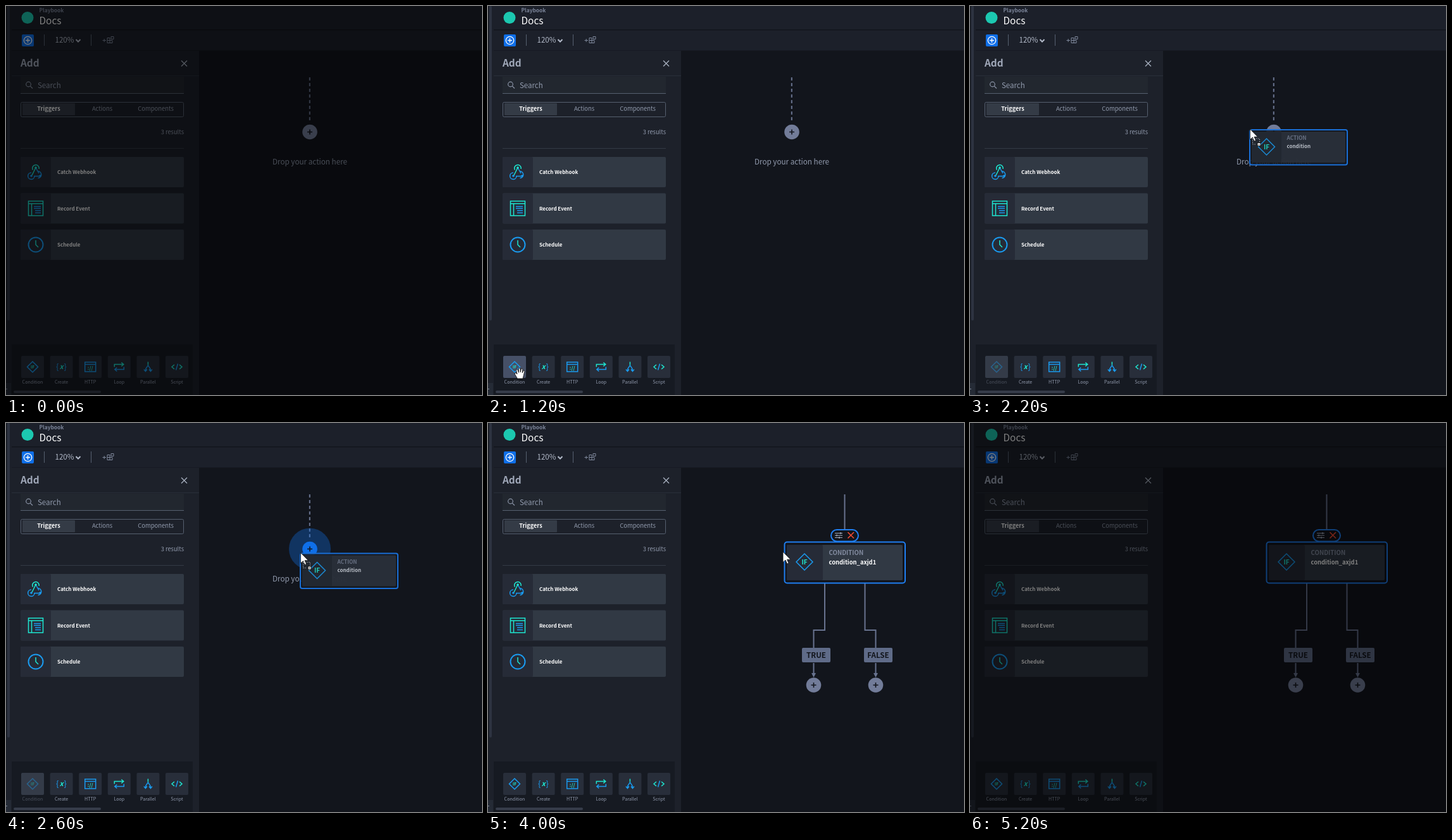
Recreate the animation shown at these times as an HTML page. Size 752x616 px, loop 5400 ms.

```html
<!DOCTYPE html>
<html lang="en">
<head>
<meta charset="utf-8">
<title>Playbook</title>
<style>
  html, body { margin: 0; width: 100%; height: 100%; overflow: hidden; background: #12151c; }
  svg { display: block; }
  text { font-family: "Noto Sans CJK JP", "Noto Sans CJK SC", "Noto Sans CJK", "Open Sans", sans-serif; fill: #929bae; }
  .b { font-weight: 700; }
  .w { fill: #fff; }
  .m { text-anchor: middle; }
  .blue, .teal, .line { fill: none; stroke-width: 1.5; }
  .blue { stroke: #1a9bf0; }
  .teal { stroke: #1ee8d2; }
  .line { stroke: #68738f; stroke-width: 2; }
  .tealText { fill: #1ee8d2; }
  .head { fill: #68738f; }
</style>
</head>
<body>
<svg id="stage" width="752" height="616" viewBox="0 0 752 616"></svg>
<script>
const $ = id => document.getElementById(id);
const rect = (x, y, w, h, fill, more = '') =>
  `<rect x="${x}" y="${y}" width="${w}" height="${h}" fill="${fill}" ${more}/>`;
const text = (x, y, size, str, cls = '', more = '') =>
  `<text x="${x}" y="${y}" font-size="${size}" class="${cls}" ${more}>${str}</text>`;
const path = (cls, d, more = '') => `<path class="${cls}" d="${d}" ${more}/>`;
const at = (x, y, body) => `<g transform="translate(${x} ${y})">${body}</g>`;

const diamond = (r, size) =>
  path('blue', `M0 ${-r}L${r} 0 0 ${r} ${-r} 0Z`) + text(0, size * .37, size, 'IF', 'b m tealText');
const plus = (x, y, id = '') => at(x, y,
  `<circle r="11.8" fill="#727c99" ${id}/><path d="M-4 0H4M0-4V4" stroke="#12151c" stroke-width="1.6"/>`);

const cardIcons = {
  'Catch Webhook':
    path('teal', 'M-4.5-3.5A5.2 5.2 0 1 1 5-5M0-7L-6 5') +
    path('blue', 'M-7 1A5.2 5.2 0 1 0-2 7M-3 6.500H7M3-1.500A5.200 5.200 0 1 1 3.500 9.500M0-7L5 2') +
    '<circle cy="-7" r="1.8" fill="#1ee8d2"/><circle cx="-7" cy="6" r="1.8" fill="#1a9bf0"/><circle cx="7" cy="6" r="1.8" fill="#1a9bf0"/>',
  'Record Event':
    path('teal', 'M-11.500-11.500H11.500V11.500H-11.500ZM-11.500-7.500H11.500M-6.500-7.500V11.500') +
    path('blue', 'M-3-3H8M-3 0H8M-1 3.500H8M-1 7H8'),
  'Schedule':
    '<circle r="11.500" class="blue" style="stroke-width:2"/>' + path('teal', 'M0-7V0L4 4', 'stroke-width="2"')
};

const tileIcons = {
  Condition: diamond(8.5, 6.5),
  Create: text(-8.5, 4, 13, '{', '', 'style="fill:#1a9bf0"') + text(4, 4, 13, '}', '', 'style="fill:#1a9bf0"') +
    text(0, 3.5, 11, 'x', 'b m tealText', 'font-style="italic"'),
  HTTP: path('blue', 'M-8.500-7.500H8.500V7.500H-8.500ZM-8.500-4H8.500') + text(0, 4.5, 8, '://', 'b m tealText'),
  Loop: path('teal', 'M-7.500 0V-4H6M3.500-7L7-4 3.500-1') + path('blue', 'M7.500 0V4H-6M-3.500 1L-7 4-3.500 7'),
  Parallel: path('teal', 'M0-8V-3') + path('blue', 'M0-3C0 0-4 0-4 6M0-3C0 0 4 0 4 6M-6.500 4L-4 7-1.500 4M1.500 4L4 7 6.500 4'),
  Script: path('teal', 'M-4-3.500L-8 0-4 3.500M4-3.500L8 0 4 3.500') + path('blue', 'M1.500-5L-1.500 5')
};

const cards = Object.entries(cardIcons).map(([name, icon], i) => {
  const y = 239 + i * 57.5;
  return rect(23, y, 258, 48, '#313944', 'rx="2"') + rect(23, y, 48, 48, '#262b37', 'rx="2"') +
    at(47, y + 24, icon) + text(81, y + 27, 8, name, 'b w');
}).join('');

const tiles = Object.entries(tileIcons).map(([name, icon], i) =>
  at(24 + i * 45.6, 554, rect(0, 0, 36, 35, '#282e3a', `rx="2" id="tile${i}"`) +
    `<g id="face${i}">${at(18, 17.5, icon)}${text(18, 44, 7.1, name, 'm')}</g>`)).join('');

const header =
  rect(0, 0, 752, 71, '#1c202a') + rect(9, 37, 743, 1.5, '#12151c') + rect(9, 70.5, 743, 1.5, '#12151c') +
  '<circle cx="34" cy="18.500" r="9.500" fill="#1cc8b0"/>' +
  text(52.5, 10, 8.4, 'Playbook', 'b', 'style="fill:#7b8499"') + text(52.5, 29, 15.4, 'Docs', 'w') +
  rect(25, 45, 19, 19, '#0f6fe8', 'rx="2"') +
  '<g fill="none" stroke="#fff" stroke-width="1.3"><circle cx="34.500" cy="54.500" r="6.200"/><path d="M31 54.500H38M34.500 51V58"/></g>' +
  rect(60, 45, 1, 18, '#566070') + rect(134, 45, 1, 18, '#566070') +
  text(77.5, 58, 11.6, '120%', '', 'style="fill:#b3bac9"') +
  '<path d="M110.500 53L114 56.500 117.500 53" fill="none" stroke="#b3bac9" stroke-width="2"/>' +
  '<path d="M152.500 54.500H158M155.200 52V57M160 50.500H164V58.500H160ZM160 54.500H168V58.500H164M166 48.500H170V52.500H166Z" fill="none" stroke="#7f889c"/>';

const panel =
  rect(0, 71, 305, 545, '#1d212a') + rect(9, 110, 296, 1, '#292f3a') +
  text(23, 96, 15.4, 'Add', 'b', 'style="fill:#a0a8b9"') +
  '<path d="M277 86.500L286 95.500M286 86.500L277 95.500" stroke="#a6aebd" stroke-width="1.400"/>' +
  rect(23, 112, 258, 26, '#22272f') + rect(23, 138, 258, 1, '#566070') +
  '<g fill="none" stroke="#8c95a8" stroke-width="1.200"><circle cx="35.500" cy="124" r="3.800"/><path d="M38.300 126.800L42 130.500"/></g>' +
  text(50, 130, 11.5, 'Search') +
  rect(23.5, 152.5, 257, 23, 'none', 'rx="2" stroke="#566070"') + rect(26, 154, 83, 19, '#343b46', 'rx="1"') +
  text(67.5, 166, 9.1, 'Triggers', 'b m w') + text(152, 166, 9.35, 'Actions', 'm') + text(236.5, 166, 9.45, 'Components', 'm') +
  text(281, 203, 9.3, '3 results', '', 'text-anchor="end"') + rect(23, 225, 258, 1, '#343a45') + cards +
  rect(9, 536, 286, 80, '#161a22') + tiles + rect(12, 609, 138, 4, '#363c4a', 'rx="2"') +
  rect(0, 0, 1, 616, '#161a22') + rect(2, 0, 4, 498, '#2d3341', 'rx="2"') +
  rect(0, 597, 8, 19, '#252b36') + rect(0, 606, 2, 1, '#7f889c');

const emptyFlow = '<g id="empty">' +
  path('line', 'M479.800 113V184', 'stroke-dasharray="5 4"') +
  '<circle id="halo" cx="480" cy="199.500" fill="#0f6fe8" fill-opacity=".34"/>' + plus(480, 199.5, 'id="spot"') +
  text(480, 251, 11.7, 'Drop your action here', 'm') + '</g>';

const branch = (x, name) => rect(x, 356, 45, 23, '#5f6b88', 'rx="2"') +
  text(x + 22.5, 372, 11.6, name, 'b m', 'style="fill:#12151c"');
const flow = '<g id="flow"><g id="wires">' +
  path('line', 'M563.500 113V186M532 254V328H514.500V356M595.500 254V328H612.500V356M514.500 380V398M612.500 380V398') +
  path('head', 'M560 181H567L563.500 188ZM511 396H518L514.500 403ZM609 396H616L612.500 403Z') + '</g>' +
  rect(468.5, 188.5, 190.5, 65, '#12151c', 'rx="4" stroke="#1f7ff2" stroke-width="2"') +
  rect(472, 193, 183, 56, '#313944', 'rx="2"') + rect(472, 193, 57, 56, '#262b37', 'rx="2"') +
  at(500, 220, diamond(13, 10)) +
  text(538.5, 209, 9.7, 'CONDITION', 'b', 'style="fill:#848da2"') + text(538.5, 224, 9.4, 'condition_axjd1', 'b w') +
  '<g id="pill">' + rect(542, 169, 43, 18.5, '#12151c', 'rx="9.200" stroke="#1f7ff2" stroke-width="2"') +
  '<path d="M548 174.500H560M548 178H560M548 181.500H560M557 173V176M551 176.500V179.500M555 180V183" stroke="#a6aebd" stroke-width="1.200"/>' +
  '<path d="M568.500 173L578 182.500M578 173L568.500 182.500" stroke="#ef4a32" stroke-width="1.700"/></g>' +
  branch(496, 'TRUE') + branch(594, 'FALSE') + plus(514.5, 415) + plus(612.5, 415) + '</g>';

const ghost = '<g id="ghost">' +
  rect(1, 1, 154, 55.5, '#161a22', 'rx="3" fill-opacity=".85" stroke="#1a6fd6" stroke-width="2"') +
  rect(4, 4, 148, 49, '#2c323d', 'rx="2" fill-opacity=".85"') + rect(4, 4, 47, 49, '#222731', 'rx="2" fill-opacity=".85"') +
  `<g opacity=".85">${at(27.5, 28, diamond(13, 10))}${text(59.5, 17, 8.3, 'ACTION', 'b', 'style="fill:#737c90"')}` +
  text(59.5, 30, 8, 'condition', 'b', 'style="fill:#d3d8e1"') + '</g></g>';

const cursors =
  '<g id="arrow"><path d="M0 0V16.500L4 13 6.500 19 9 18 6.500 12.200H12Z" fill="#fff" stroke="#111" stroke-width=".8"/>' +
  '<g id="copy"><path d="M4 15H15V22" fill="none" stroke="#ddd" stroke-dasharray="1 2"/><path d="M4 15V24H9" fill="none" stroke="#ddd" stroke-dasharray="1 2"/>' +
  '<rect x="11.500" y="21.500" width="5" height="5" fill="#fff" stroke="#111"/><path d="M13 24H15" stroke="#111"/></g></g>' +
  '<g id="hand"><path d="M4.500 18L1 12 0 9.500 2 9 4 11 2.500 4 4.500 3.300 6.500 8.500 6.500 1.500 8.700 1.200 9.200 8 10.700 2 12.700 2.500 12.200 9 14.200 5 16 5.800 14 14 13 18Z" fill="#fff" stroke="#111" stroke-width=".8"/></g>' +
  '<g id="deny"><circle r="6" fill="#fff" stroke="#d21a1a" stroke-width="2.600"/><path d="M-4-4L4 4" stroke="#d21a1a" stroke-width="2.600"/></g>';

$('stage').innerHTML = rect(0, 0, 752, 616, '#12151c') + emptyFlow + flow + header + panel +
  ghost + cursors + rect(0, 0, 752, 616, '#000', 'id="dim" opacity=".5"');

const STEP = 200, STEPS = 27;
// Each entry: first step, pointer kind, x, y
const moves = [
  [0, ''], [3, 'arrow', 12, 575], [4, 'hand', 32, 568], [5, 'hand', 42, 572],
  [8, 'deny', 148, 396], [9, 'deny', 295, 307], [10, 'arrow', 415, 258], [11, 'arrow', 441, 195],
  [12, 'arrow', 457, 208], [13, 'arrow', 464, 205.5], [14, 'arrow', 469, 204], [17, 'hand', 461, 193],
  [20, 'arrow', 466, 204], [21, 'arrow', 438, 371], [22, 'arrow', 322, 500], [23, 'arrow', 184, 604], [24, '']
];
const show = (id, on) => $(id).style.display = on ? '' : 'none';
const place = (id, x, y) => $(id).setAttribute('transform', `translate(${x} ${y})`);
const set = (id, name, value) => $(id).setAttribute(name, value);

function draw(step) {
  const within = (a, b) => step >= a && step < b;
  const dragging = within(8, 17), hot = within(12, 17), dropped = step >= 17;
  const [, kind, x = 0, y = 0] = moves.findLast(m => m[0] <= step);
  for (const id of ['arrow', 'hand', 'deny']) {
    show(id, id === kind);
    place(id, x + (id === 'deny' ? 1 : dragging ? 1.5 : 0), y - (id === 'deny' ? 2 : 0));
  }
  show('copy', dragging);
  show('ghost', dragging);
  place('ghost', x, y);

  show('empty', !dropped);
  show('flow', dropped);
  show('halo', hot);
  set('halo', 'r', 40 - 7 * Math.abs(step < 15 ? 14 - step : 1));
  set('spot', 'fill', hot ? '#0f6fe8' : '#727c99');
  set('wires', 'opacity', step === 17 ? .55 : 1);
  set('pill', 'opacity', step === 17 ? .35 : step === 18 ? .92 : 1);

  const lifted = within(7, 17), hover = within(4, 7) || within(17, 20);
  set('tile0', 'fill', hover ? '#465067' : lifted ? '#343b48' : '#282e3a');
  set('face0', 'opacity', lifted ? .42 : 1);
  show('dim', step === 0 || step === STEPS - 1);
}

const start = performance.now();
let last = -1;
function tick() {
  const step = Math.floor((performance.now() - start) / STEP) % STEPS;
  if (step !== last) draw(last = step);
  requestAnimationFrame(tick);
}
tick();
</script>
</body>
</html>
```
